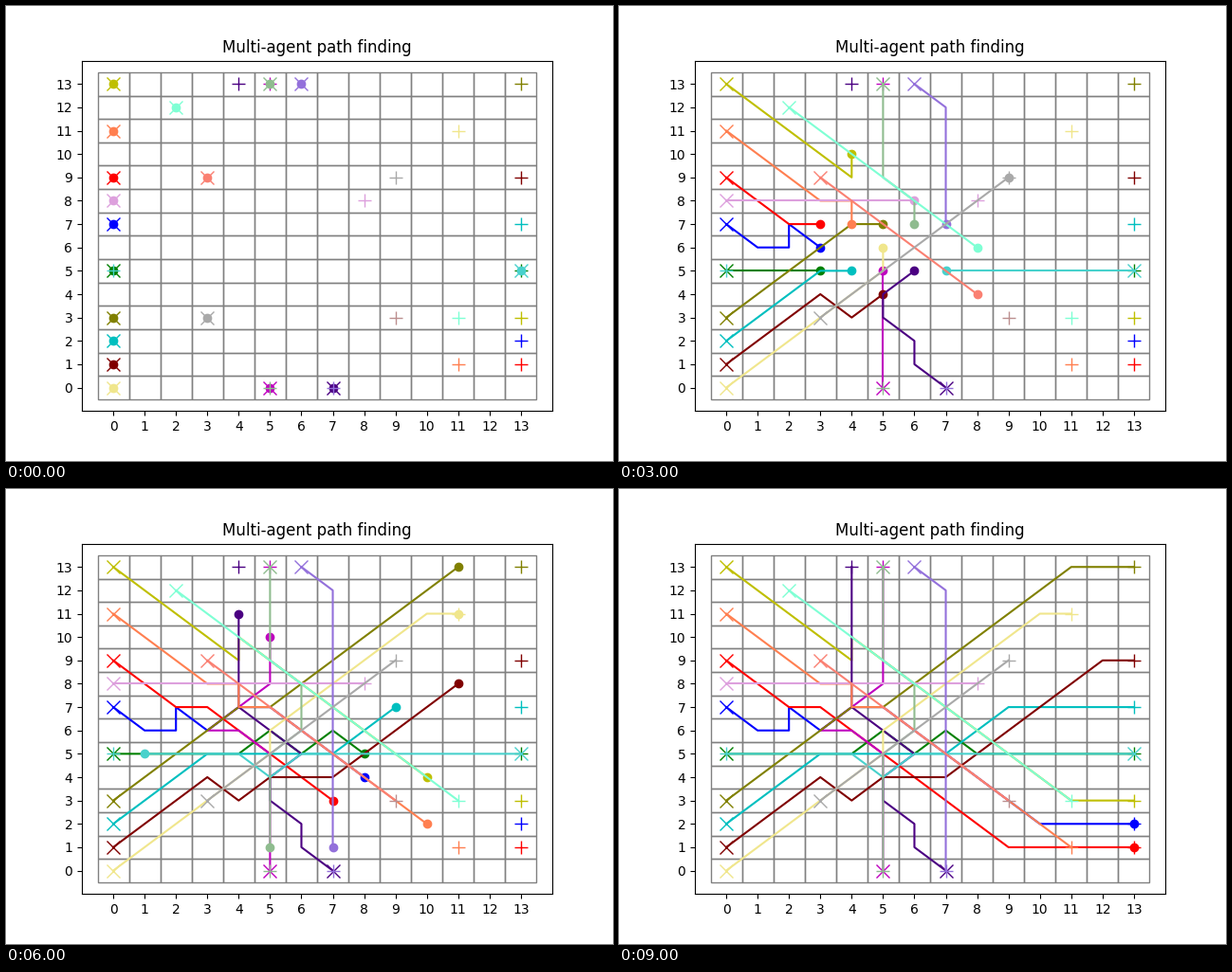
A matplotlib script for the animation above (10000 ms loop, 640 by 480 pixels).

```python
import matplotlib.pyplot as plt
from matplotlib.animation import FuncAnimation
from matplotlib.patches import Rectangle

SIZE = 14
FRAMES, INTERVAL = 20, 500
LAST_STEP = 18

# Colour, start cell and moves; a number repeats a move, "O" waits.
AGENTS = [
    ("b", (0, 7), "SE E O2 N SE NE E SE O SE3 O SE E3"),
    ("g", (0, 5), "E O E O E O E NE O SE NE SE E5"),
    ("r", (0, 9), "O SE2 E O3 SE2 O SE4 E4"),
    ("c", (0, 2), "NE3 O E O E2 O E NE2 E4"),
    ("m", (5, 0), "N O N4 NW W NE2 N5"),
    ("y", (0, 13), "SE4 O N SE7 E2"),
    ("maroon", (0, 1), "NE3 O SE NE E2 NE5 E"),
    ("olive", (0, 3), "NE4 E O NE6 E2"),
    ("indigo", (7, 0), "NW N NW N NE O NW2 N6"),
    ("coral", (0, 11), "SE3 O E S E SE6"),
    ("khaki", (0, 0), "NE5 N NE5 E"),
    ("plum", (0, 8), "E8"),
    ("mediumturquoise", (13, 5), "W7 SW NW W4"),
    ("mediumpurple", (6, 13), "SE S12"),
    ("darkseagreen", (5, 13), "S4 SE S2 SW S5"),
    ("salmon", (3, 9), "SE2 O SE4"),
    ("aquamarine", (2, 12), "SE9"),
    ("darkgray", (3, 3), "NE6"),
]
GOAL_COLORS = {"salmon": "rosybrown"}


def walk(start, moves):
    """Return the cell occupied at every step."""
    x, y = start
    cells = [(x, y)]
    for token in moves.split():
        heading = token.rstrip("0123456789")
        for _ in range(int(token[len(heading):] or 1)):
            x += ("E" in heading) - ("W" in heading)
            y += ("N" in heading) - ("S" in heading)
            cells.append((x, y))
    return cells


fig, ax = plt.subplots(figsize=(6.4, 4.8), dpi=100)
ax.set_title("Multi-agent path finding")
ax.set_xlim(-1, SIZE)
ax.set_ylim(-1, SIZE)
ax.set_xticks(range(SIZE))
ax.set_yticks(range(SIZE))

for col in range(SIZE):
    for row in range(SIZE):
        ax.add_patch(Rectangle((col - 0.5, row - 0.5), 1, 1,
                               facecolor="none", edgecolor="gray"))

tracks = []
for color, start, moves in AGENTS:
    cells = walk(start, moves)
    trail, = ax.plot([], [], color=color)
    ax.plot(*start, "x", color=color, markersize=10)
    dot, = ax.plot([], [], "o", color=color)
    ax.plot(*cells[-1], "+", color=GOAL_COLORS.get(color, color),
            markersize=10)
    tracks.append((cells, trail, dot))


def update(frame):
    step = min(frame, LAST_STEP)
    artists = []
    for cells, trail, dot in tracks:
        trail.set_data(*zip(*cells[:step + 1]))
        # The dot leaves the board one step after arrival.
        here = cells[step:step + 1]
        dot.set_data([x for x, _ in here], [y for _, y in here])
        artists += [trail, dot]
    return artists


anim = FuncAnimation(fig, update, frames=FRAMES, interval=INTERVAL,
                     repeat=True, repeat_delay=0, blit=False)
plt.show()
```
